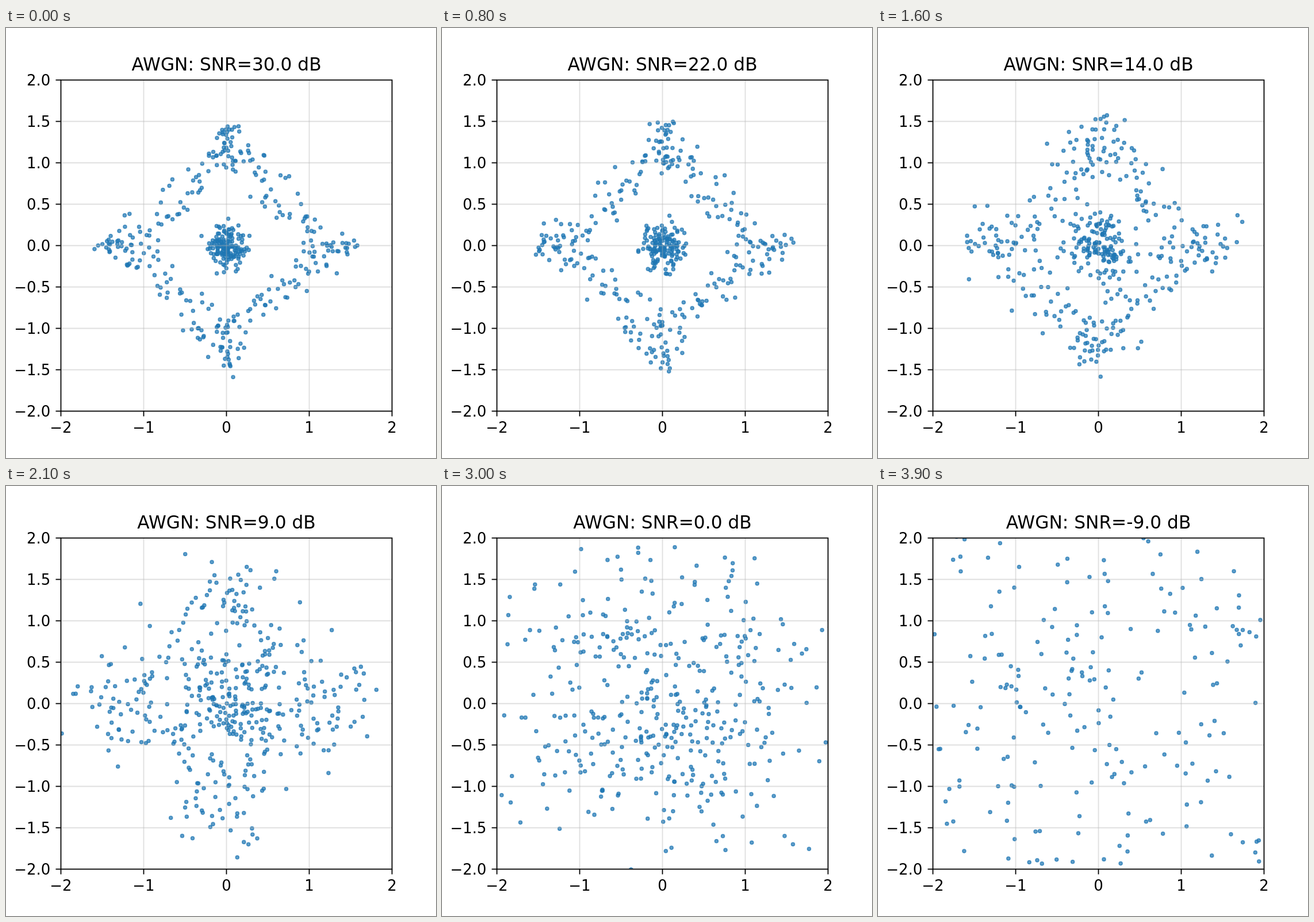
An HTML page with a canvas that plays this animation: 748 px wide and 748 px high, repeating every 4000 ms.

```html
<!DOCTYPE html>
<html lang="en">
<head>
<meta charset="utf-8">
<title>AWGN constellation</title>
<style>
  html, body { margin: 0; width: 100%; height: 100%; overflow: hidden; background: #fff; }
  canvas { display: block; }
</style>
</head>
<body>
<canvas id="stage" width="748" height="748"></canvas>
<script>
const ctx = document.getElementById('stage').getContext('2d');
const LEFT = 95.5, TOP = 90.5, SIZE = 576, UNIT = SIZE / 4;
const RIGHT = LEFT + SIZE, BOTTOM = TOP + SIZE;
const STEP_MS = 100, STEPS = 40, START_DB = 30;
const NOISE_POWER = 0.52; // per axis, at 0 dB
const RING_POINTS = 304, CENTRE_POINTS = 146;
const px = x => LEFT + (x + 2) * UNIT;
const py = y => TOP + (2 - y) * UNIT;

function randomSource(seed) {
  return () => {
    seed = (seed + 0x6D2B79F5) | 0;
    let t = Math.imul(seed ^ (seed >>> 15), 1 | seed);
    t = (t + Math.imul(t ^ (t >>> 7), 61 | t)) ^ t;
    return ((t ^ (t >>> 14)) >>> 0) / 4294967296;
  };
}

function gaussianSource(random) {
  return () => Math.sqrt(-2 * Math.log(1 - random())) * Math.cos(2 * Math.PI * random());
}

// A diamond ring, denser at its corners, around a compact centre
function makeSignal() {
  const random = randomSource(7);
  const gauss = gaussianSource(random);
  const points = [];
  for (let i = 0; i < RING_POINTS; i++) {
    const radius = 0.92 + 0.63 * random();
    const along = Math.sin(random() * Math.PI / 2) ** 2;
    const x = radius * (1 - along) * (i & 1 ? 1 : -1);
    const y = radius * along * (i & 2 ? 1 : -1);
    points.push([x + 0.04 * gauss(), y + 0.04 * gauss()]);
  }
  for (let i = 0; i < CENTRE_POINTS; i++) points.push([0.12 * gauss(), 0.12 * gauss()]);
  return points;
}

const signal = makeSignal();

function line(x1, y1, x2, y2) {
  ctx.beginPath();
  ctx.moveTo(x1, y1);
  ctx.lineTo(x2, y2);
  ctx.stroke();
}

function label(text, x, y, size, align) {
  ctx.font = `${size}px "DejaVu Sans", sans-serif`;
  ctx.textAlign = align;
  ctx.fillText(text, x, y);
}

function drawPoints(step, snr) {
  const gauss = gaussianSource(randomSource(1000 + step * 7919));
  const sigma = Math.sqrt(NOISE_POWER * 10 ** (-snr / 10));
  ctx.save();
  ctx.beginPath();
  ctx.rect(LEFT, TOP, SIZE, SIZE);
  ctx.clip();
  ctx.lineWidth = 1.7;
  ctx.fillStyle = ctx.strokeStyle = 'rgba(31, 119, 180, 0.7)';
  for (const [x, y] of signal) {
    ctx.beginPath();
    ctx.arc(px(x + sigma * gauss()), py(y + sigma * gauss()), 2.95, 0, 2 * Math.PI);
    ctx.fill();
    ctx.stroke();
  }
  ctx.restore();
}

function drawAxes() {
  ctx.lineWidth = 1.8;
  ctx.strokeStyle = 'rgba(176, 176, 176, 0.4)';
  for (let x = -1; x <= 1; x++) line(px(x), TOP, px(x), BOTTOM);
  for (let y = -1.5; y <= 1.5; y += 0.5) line(LEFT, py(y), RIGHT, py(y));

  ctx.strokeStyle = ctx.fillStyle = '#000';
  ctx.strokeRect(LEFT, TOP, SIZE, SIZE);
  const signed = text => text.replace('-', '\u2212');
  for (let x = -2; x <= 2; x++) {
    line(px(x), BOTTOM, px(x), BOTTOM + 9);
    label(signed(String(x)), px(x), 703.6, 25.97, 'center');
  }
  for (let y = -2; y <= 2; y += 0.5) {
    line(LEFT - 9, py(y), LEFT, py(y));
    label(signed(y.toFixed(1)), LEFT - 18.2, py(y) + 9.4, 25.97, 'right');
  }
}

let shown = -1;
function render(now) {
  const step = Math.floor(now / STEP_MS) % STEPS;
  if (step !== shown) {
    shown = step;
    const snr = START_DB - step;
    ctx.fillStyle = '#fff';
    ctx.fillRect(0, 0, 748, 748);
    drawPoints(step, snr);
    drawAxes();
    label(`AWGN: SNR=${snr.toFixed(1)} dB`, px(0), 74.4, 31.22, 'center');
  }
  requestAnimationFrame(render);
}
render(performance.now());
</script>
</body>
</html>
```
